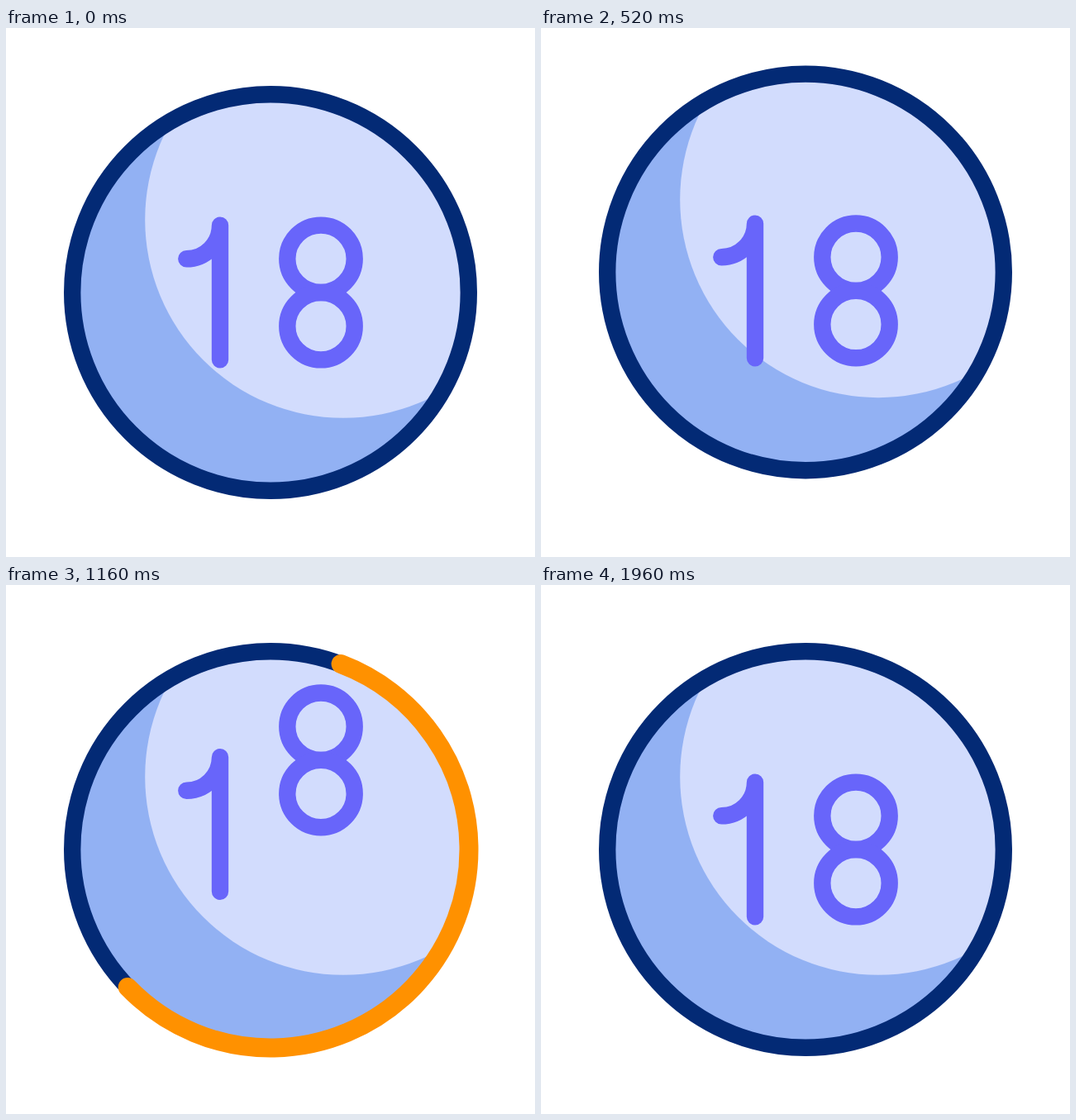
These frames come from a looping animation (640 px wide and 640 px high, 2000 ms). An HTML page:

```html
<!DOCTYPE html>
<html lang="en">
<head>
<meta charset="utf-8">
<title>18</title>
<style>
  html, body { margin: 0; height: 100%; overflow: hidden; background: #fff; }
  svg { display: block; width: 100vw; height: 100vh; }
  .line { fill: none; stroke-linecap: round; stroke-linejoin: round; }
</style>
</head>
<body>
<svg viewBox="0 0 640 640">
  <defs>
    <clipPath id="disc"><circle cx="320" cy="320" r="239"/></clipPath>
    <path id="one" d="M218.3 279.3A40.7 40.7 0 0 0 259 238.7V401.3"/>
    <g id="eight"><circle cx="381" cy="279.3" r="40.7"/><circle cx="381" cy="360.7" r="40.7"/></g>
  </defs>
  <g id="ball">
    <g clip-path="url(#disc)">
      <circle cx="320" cy="320" r="240" fill="#92b1f3"/>
      <circle cx="408" cy="232" r="239.8" fill="#d2dcfd"/>
      <g class="line" stroke="#6865fa" stroke-width="20.4">
        <use id="oneOut" href="#one"/><use id="oneIn" href="#one"/>
        <use id="eightOut" href="#eight"/><use id="eightIn" href="#eight"/>
      </g>
    </g>
    <circle class="line" cx="320" cy="320" r="239.8" stroke="#032a75" stroke-width="20.4"/>
  </g>
  <circle id="arc" class="line" cx="320" cy="320" r="240" pathLength="1" stroke="#ff9100"
    stroke-width="23" transform="rotate(-91.1 320 320)"/>
</svg>
<script>
const LOOP = 2000, STEP = 40, LAG = 80, SOFT = 1 / 3;
const el = id => document.getElementById(id);
const show = (id, on) => el(id).style.display = on ? '' : 'none';
const shift = (id, y) => el(id).setAttribute('transform', `translate(0 ${y.toFixed(2)})`);

// cubic-bezier(a, 0, 1 - b, 1), solved by bisection.
function ease(x, a = SOFT, b = SOFT) {
  let lo = 0, hi = 1, s = x;
  for (let i = 0; i < 24; i++) {
    s = (lo + hi) / 2;
    const at = 3 * a * s * (1 - s) ** 2 + 3 * (1 - b) * s * s * (1 - s) + s ** 3;
    if (at < x) lo = s; else hi = s;
  }
  return s * s * (3 - 2 * s);
}

// Keys are [time, value, ease out of the last key, ease into this key].
function track(t, keys) {
  if (t <= keys[0][0]) return keys[0][1];
  for (let i = 1; i < keys.length; i++) {
    const [t0, v0] = keys[i - 1], [t1, v1, a, b] = keys[i];
    if (t < t1) return v0 + (v1 - v0) * ease((t - t0) / (t1 - t0), a, b);
  }
  return keys[keys.length - 1][1];
}

const bounce = [[120, 0], [360, 33.3], [560, -31.3], [760, 0]];
const dip = [[120, 0], [456, 22.5]];
const leave = [[625, 0], [1045, -352, SOFT, 0.5]];
const enter = [[725, 319], [1205, -120, 0.5, SOFT], [1480, 0]];
const tail = [[1040, 0], [1840, 1]];
const head = [[760, 0], [1440, 1]];

function draw(t) {
  shift('ball', track(t, bounce));
  for (const [name, lag] of [['one', LAG], ['eight', 0]]) {
    const at = t - lag;
    shift(name + 'Out', track(t, dip) + track(at, leave));
    shift(name + 'In', track(at, enter));
    show(name + 'Out', at < leave[1][0]);
    show(name + 'In', at > enter[0][0]);
  }
  const from = track(t, tail), size = track(t, head) - from;
  show('arc', size > 0.0001);
  el('arc').setAttribute('stroke-dasharray', `${size} 2`);
  el('arc').setAttribute('stroke-dashoffset', -from);
}

const start = performance.now();
function frame() {
  const t = (performance.now() - start) % LOOP;
  draw(Math.floor(t / STEP) * STEP);
  requestAnimationFrame(frame);
}
frame();
</script>
</body>
</html>
```
